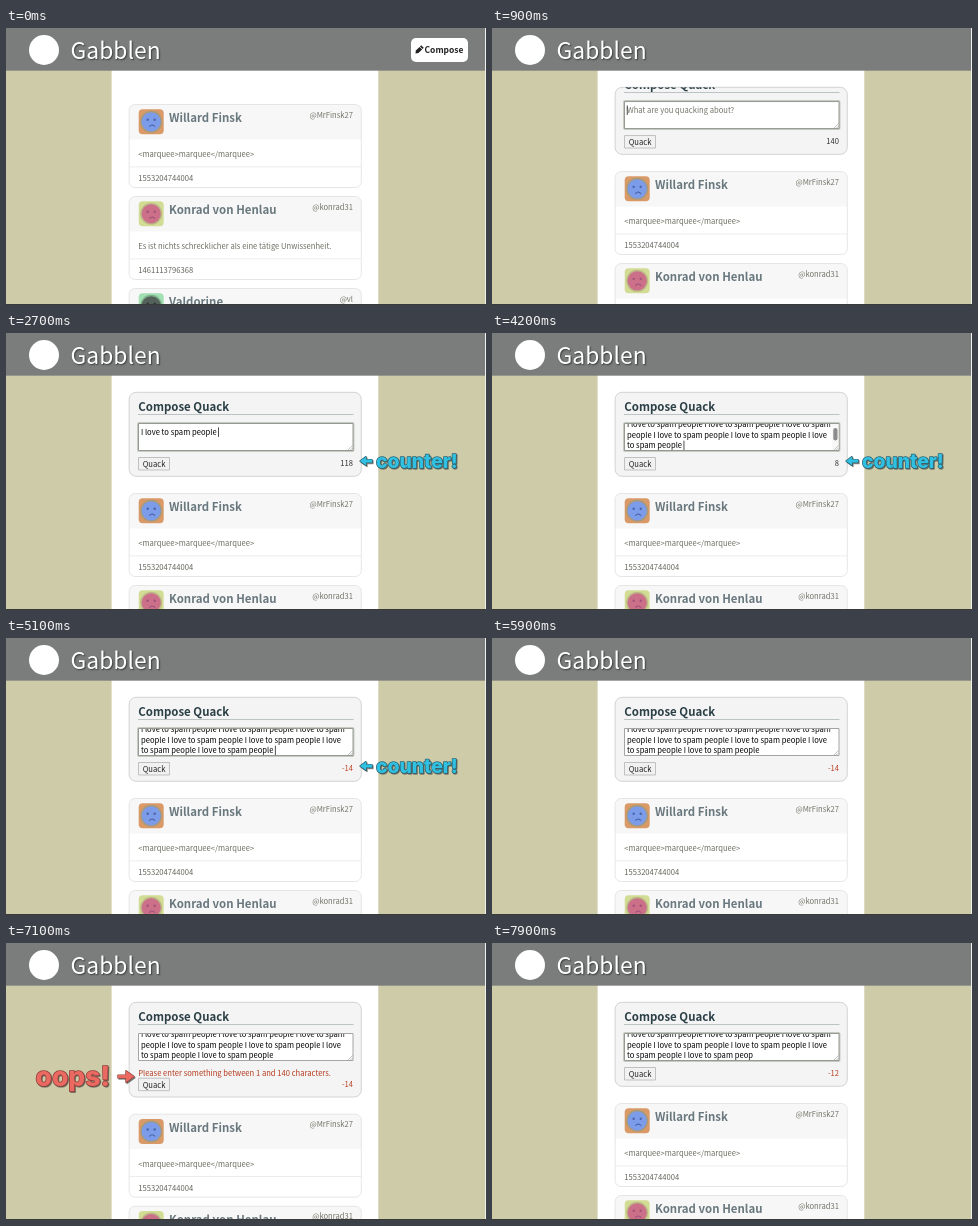
These frames come from a looping animation (480 px wide and 277 px high, 8000 ms). An HTML page with a canvas:

```html
<!DOCTYPE html>
<html lang="en">
<head>
<meta charset="utf-8">
<title>Compose box</title>
<style>
html, body { margin: 0; width: 100%; height: 100%; overflow: hidden; background: #cecba9; }
canvas { display: block; width: 480px; height: 277px; }
</style>
</head>
<body>
<canvas id="stage"></canvas>
<script>
const W = 480, H = 277, LOOP = 8000;
const canvas = document.getElementById('stage');
const ctx = canvas.getContext('2d');
const dpr = window.devicePixelRatio || 1;
canvas.width = Math.round(W * dpr);
canvas.height = Math.round(H * dpr);

const SANS = '"Noto Sans CJK SC", "Noto Sans CJK JP", "Noto Sans CJK", "Noto Sans", sans-serif';
const LABEL = 'Inter, "Open Sans", sans-serif';
const BODY = 7.63, TITLE = 11.45, BRAND = 22.9;
const BOX_X = 123.1, BOX_W = 232.2;
const FORM_TOP = 59.3, FORM_H = 84, ERROR_H = 10.7, LINE_H = 10.7, WRAP = 58;

const PHRASE = 'I love to spam people ';
const PASTES = [2900, 3150, 3400, 3650, 3950, 4900];
const DELETES = [7650, 7750, 7850];

const CARDS = [
  { name: 'Willard Finsk', handle: '@MrFinsk27', text: '<marquee>marquee</marquee>', time: '1553204744004',
    back: '#d99a68', rim: '#a99a78', face: '#7c9be8', ink: '#4a64a8' },
  { name: 'Konrad von Henlau', handle: '@konrad31', text: 'Es ist nichts schrecklicher als eine tätige Unwissenheit.', time: '1461113796368',
    back: '#d3dc94', rim: '#bdb888', face: '#cb7088', ink: '#a0527c' },
  { name: 'Valdorine', handle: '@vl', text: '', time: '',
    back: '#a2dfb2', rim: '#7fb08c', face: '#55625b', ink: '#2c3833' }
];

const clamp = v => Math.max(0, Math.min(1, v));
const swing = (t, a, b) => 0.5 - Math.cos(Math.PI * clamp((t - a) / (b - a))) / 2;
const passed = (times, t) => times.filter(x => t >= x).length;

// Laid out at a large size and scaled down, so that advances stay exact.
function setFont(weight, family) {
  ctx.font = `${weight} 100px ${family}`;
}

function textWidth(str, size) {
  setFont(400, SANS);
  return ctx.measureText(str).width * size / 100;
}

function text(str, x, y, color, { size = BODY, weight = 400, align = 'left' } = {}) {
  ctx.save();
  ctx.translate(x, y);
  ctx.scale(size / 100, size / 100);
  setFont(weight, SANS);
  ctx.textAlign = align;
  ctx.fillStyle = color;
  ctx.fillText(str, 0, 0);
  ctx.restore();
}

function rect(x, y, w, h, color) {
  ctx.fillStyle = color;
  ctx.fillRect(x, y, w, h);
}

function roundPath(x, y, w, h, r) {
  ctx.beginPath();
  ctx.roundRect(x, y, w, h, r);
}

function box(x, y, w, h, r, fill, stroke, width = 1) {
  roundPath(x, y, w, h, r);
  ctx.fillStyle = fill;
  ctx.fill();
  if (stroke) {
    ctx.strokeStyle = stroke;
    ctx.lineWidth = width;
    ctx.stroke();
  }
}

function disc(x, y, r, color) {
  ctx.beginPath();
  ctx.arc(x, y, r, 0, Math.PI * 2);
  ctx.fillStyle = color;
  ctx.fill();
}

function typedLength(t) {
  const typed = t < 1700 ? 0 : Math.min(22, 1 + Math.floor((t - 1700) / 900 * 22));
  return typed + 22 * passed(PASTES, t) - passed(DELETES, t);
}

function wrap(str) {
  const lines = [''];
  for (const word of str.match(/\S+\s*/g) || []) {
    const last = lines.length - 1;
    if ((lines[last] + word.trimEnd()).length > WRAP) lines.push(word);
    else lines[last] += word;
  }
  return lines;
}

function drawPencil(x, y) {
  ctx.save();
  ctx.translate(x, y);
  ctx.rotate(-Math.PI / 4);
  ctx.fillStyle = '#222';
  ctx.beginPath();
  ctx.moveTo(-5, 0);
  ctx.lineTo(-2.6, -1.8);
  ctx.lineTo(2.6, -1.8);
  ctx.lineTo(2.6, 1.8);
  ctx.lineTo(-2.6, 1.8);
  ctx.fill();
  ctx.fillRect(3.2, -1.8, 1.7, 3.6);
  ctx.restore();
}

function drawHeader(t) {
  rect(0, 0, W, 42.67, '#7b7d7c');
  disc(38, 22, 15, '#fff');
  ctx.save();
  ctx.shadowColor = 'rgba(40,40,40,.75)';
  ctx.shadowOffsetX = ctx.shadowOffsetY = dpr;
  ctx.shadowBlur = 1.5 * dpr;
  text('Gabblen', 64.5, 30.5, '#fff', { size: BRAND, weight: 500 });
  ctx.restore();
  if (t < 500) {
    box(405, 10, 57, 24, 5, '#fff');
    drawPencil(413, 22);
    text('Compose', 418.5, 25, '#222', { weight: 700, size: 8.5 });
  }
}

function drawAvatar(x, y, { back, rim, face, ink }) {
  box(x, y, 25, 25, 4, back);
  disc(x + 12.5, y + 12.5, 11, rim);
  disc(x + 12.5, y + 12.5, 9.6, face);
  disc(x + 9, y + 10.5, 1.2, ink);
  disc(x + 16, y + 10.5, 1.2, ink);
  ctx.beginPath();
  ctx.arc(x + 13.5, y + 19, 3.2, Math.PI * 1.15, Math.PI * 1.85);
  ctx.strokeStyle = ink;
  ctx.lineWidth = 1.1;
  ctx.stroke();
}

function drawCard(card, y) {
  const h = 83;
  box(BOX_X, y, BOX_W, h, 6, '#fff');
  ctx.save();
  roundPath(BOX_X, y, BOX_W, h, 6);
  ctx.clip();
  rect(BOX_X, y, BOX_W, 35, '#f7f7f7');
  rect(BOX_X, y + 62, BOX_W, 0.8, '#e9e9e9');
  ctx.restore();
  roundPath(BOX_X, y, BOX_W, h, 6);
  ctx.strokeStyle = '#e0e0e0';
  ctx.lineWidth = 0.8;
  ctx.stroke();
  drawAvatar(132.7, y + 4.8, card);
  text(card.name, 163, y + 17.3, '#69787e', { size: TITLE, weight: 700 });
  text(card.handle, 347, y + 13, '#74746a', { align: 'right' });
  text(card.text, 132.2, y + 52.8, '#6e6e62');
  text(card.time, 132.2, y + 76.5, '#64645c');
}

function drawField(t) {
  const x = 132.5, y = 90.5, w = 214.5, h = 27;
  const focused = t < 5750 || t >= 7600;
  if (focused) box(x - 0.5, y - 0.5, w + 1, h + 1, 1, '#fff', '#c6cac1', 2);
  box(x, y, w, h, 0, '#fff', focused ? '#959a93' : '#a4a4a4');

  const str = PHRASE.repeat(7).slice(0, typedLength(t));
  const lines = wrap(str);
  const scroll = lines.length > 2 ? 8 : 0;
  const baseline = i => 102 + i * LINE_H - scroll;
  ctx.save();
  ctx.beginPath();
  ctx.rect(x + 0.5, y + 0.5, w - 1, h - 1);
  ctx.clip();
  if (str) lines.forEach((line, i) => text(line.trimEnd(), 135, baseline(i), '#000'));
  else text('What are you quacking about?', 135, 102, '#74746a');
  if (t < 5750) {
    const last = lines.length - 1;
    rect(134.8 + textWidth(lines[last], BODY), baseline(last) - 7.7, 0.8, 9.6, '#222');
  }
  const bar = scroll && t < 4800 ? 1 - clamp((t - 4200) / 400) : 0;
  if (bar > 0) {
    ctx.globalAlpha = bar;
    rect(340, y, 7, h, '#f8f8f8');
    box(341.3, 95, 4.2, 12.5, 2.1, '#8c8c8c');
  }
  ctx.restore();

  ctx.strokeStyle = '#9a9a9a';
  ctx.lineWidth = 0.6;
  ctx.beginPath();
  for (const d of [2, 4.5]) {
    ctx.moveTo(346.5 - d, 117);
    ctx.lineTo(346.5, 117 - d);
  }
  ctx.stroke();
}

function drawForm(t, open, error) {
  const h = FORM_H * open + ERROR_H * error;
  if (h < 1) return;
  box(BOX_X, FORM_TOP, BOX_W, h, Math.min(7, h / 2), '#f4f4f4', '#c8cac9', 0.8);
  ctx.save();
  ctx.beginPath();
  ctx.rect(BOX_X, FORM_TOP, BOX_W, h);
  ctx.clip();
  ctx.translate(0, FORM_H * (open - 1));
  text('Compose Quack', 132.2, 77.5, '#2b3f46', { size: TITLE, weight: 700 });
  rect(132, 81, 215.5, 0.8, '#aeb7ba');
  drawField(t);

  if (error > 0) {
    ctx.save();
    ctx.beginPath();
    ctx.rect(124, 122, 231, ERROR_H * error + 2);
    ctx.clip();
    text('Please enter something between 1 and 140 characters.', 132.2, 132.7, '#b53a1c');
    ctx.restore();
  }
  ctx.translate(0, ERROR_H * error);
  box(132.5, 124.5, 31, 12.5, 0, '#f1f1f1', '#b4b4b4', 0.8);
  text('Quack', 148, 133.8, '#222', { align: 'center' });
  const left = 140 - typedLength(t - 60);
  text(String(left), 347, 133.3, left < 0 ? '#bb4325' : '#333', { align: 'right' });
  ctx.restore();
}

function arrow(x, y, len, dir) {
  ctx.save();
  ctx.translate(x, y);
  ctx.scale(dir, 1);
  const half = len * 0.36, neck = len * 0.5;
  ctx.beginPath();
  ctx.moveTo(0, -1.4);
  ctx.lineTo(neck, -1.4);
  ctx.lineTo(neck, -half);
  ctx.lineTo(len, 0);
  ctx.lineTo(neck, half);
  ctx.lineTo(neck, 1.4);
  ctx.lineTo(0, 1.4);
  ctx.closePath();
  ctx.lineJoin = 'round';
  ctx.lineWidth = 1.4;
  ctx.stroke();
  ctx.fill();
  ctx.restore();
}

function callout(str, x, y, size, fill, edge, tail, tailY, len, dir) {
  const layer = (dx, dy, main, outline) => {
    ctx.save();
    ctx.translate(dx, dy);
    ctx.fillStyle = main;
    ctx.strokeStyle = outline;
    arrow(tail, tailY, len, dir);
    ctx.translate(x, y);
    ctx.scale(size / 100, size / 100);
    setFont(800, LABEL);
    ctx.lineJoin = 'round';
    ctx.lineWidth = 140 / size;
    ctx.strokeText(str, 0, 0);
    ctx.fillText(str, 0, 0);
    ctx.restore();
  };
  const shade = 'rgba(70,70,65,.6)';
  layer(1, 1.2, shade, shade);
  layer(0, 0, fill, edge);
}

function draw(t) {
  ctx.setTransform(canvas.width / W, 0, 0, canvas.height / H, 0, 0);
  rect(0, 0, W, H, '#cecba9');
  rect(105.6, 42, 266.7, H, '#fff');

  const open = swing(t, 500, 1070);
  const error = swing(t, 5950, 6250) - swing(t, 7400, 7600);
  const top = 76.5 + FORM_H * open + ERROR_H * error;
  CARDS.forEach((card, i) => drawCard(card, top + 92 * i));
  drawForm(t, open, error);
  drawHeader(t);

  if (t >= 2100 && t < 5200)
    callout('counter!', 370, 135, 19.3, '#30c0e2', '#2a6474', 366, 128, 12, -1);
  if (t >= 6200 && t < 7400)
    callout('oops!', 29.5, 143, 26.5, '#ea6a62', '#8f3d38', 112, 133.5, 16, 1);

  rect(479, 0, 1, H, '#f0f0ee');
  rect(0, 276, W, 1, '#3a3a38');
}

function tick() {
  draw(performance.now() % LOOP);
  requestAnimationFrame(tick);
}
tick();
</script>
</body>
</html>
```
